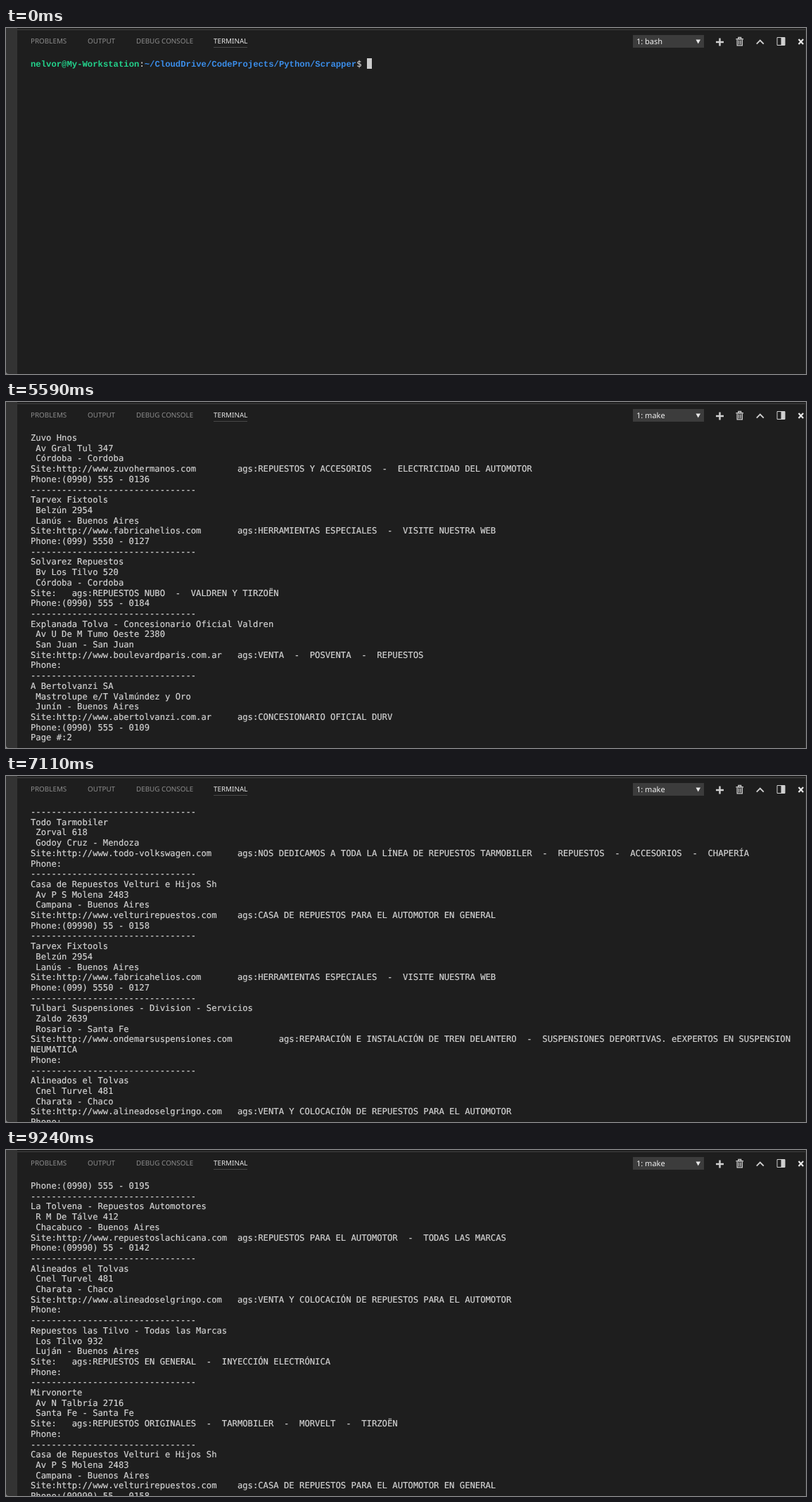
Animation, 1137 px wide and 492 px high, one loop 9.78 s. Source, as an HTML page:

```html
<!DOCTYPE html>
<html lang="es">
<head>
<meta charset="utf-8">
<title>Terminal</title>
<style>
  html, body { margin: 0; width: 100%; height: 100%; overflow: hidden; background: #1e1e1e; }
  body { position: relative; text-rendering: geometricPrecision; }
  .side { position: absolute; left: 0; top: 0; width: 16px; height: 100%; background: #888; }
  .side::after { content: ""; position: absolute; inset: 0; background: #333; border-bottom-left-radius: 4px; }
  .edge { position: absolute; left: 16px; right: 0; top: 2px; height: 1px; background: #414141; }
  .rim { position: absolute; right: 0; top: 0; width: 1px; height: 100%; background: #2c2c2c; }
  .tab { position: absolute; top: 11px; font: 9.9px/15px "Noto Sans", sans-serif; color: #8c8c8c; white-space: pre; }
  .active { color: #e7e7e7; padding-bottom: 1px; border-bottom: 1px solid #484848; }
  .select { position: absolute; left: 891px; top: 10px; width: 96px; height: 18px; padding-left: 5px;
    background: #3c3c3c; color: #f0f0f0; font: 11px/19px "Noto Sans", sans-serif; }
  svg { position: absolute; left: 0; top: 0; }
  #term { position: absolute; left: 35px; top: 44px; margin: 0; color: #d6d6d6; white-space: pre;
    font: 12.21px/14.7px "DejaVu Sans Mono", monospace; font-variant-ligatures: none;
    -webkit-text-stroke: .15px; }
  #term b { font: bold 12.25px/1px "Liberation Mono", monospace; -webkit-text-stroke: 0; }
  .user { color: #23d18b; }
  .path { color: #3b8eea; }
  .cursor { display: inline-block; position: relative; top: -1px; width: 1ch; height: 14.7px;
    vertical-align: top; background: #ccc; }
</style>
</head>
<body>
<div class="side"></div>
<div class="edge"></div>
<div class="rim"></div>
<div class="tab" style="left:35px">PROBLEMS</div>
<div class="tab" style="left:116px">OUTPUT</div>
<div class="tab" style="left:185px">DEBUG CONSOLE</div>
<div class="tab active" style="left:295px">TERMINAL</div>
<div class="select" id="shell">1: bash</div>
<svg width="1137" height="40" fill="none" stroke="#d0d0d0">
  <path d="M980.5 16.5h6.5l-3.25 6z" fill="#e8e8e8" stroke="none"/>
  <path d="M1009 20h11M1014.5 14.5v11" stroke-width="2.4"/>
  <path d="M1037.5 15.7h10.5M1041 15v-1.5h3.6V15" stroke-width="1.4"/>
  <path d="M1039.2 17v7.8h7.2V17M1041.5 17.5v6M1044 17.5v6" stroke-width="1.3"/>
  <path d="M1066.8 22.6l5-5 5 5" stroke-width="1.9"/>
  <path d="M1096 13.5h11v11h-11z"/>
  <path d="M1101.5 13.5h5.5v11h-5.5z" fill="#d0d0d0" stroke="none"/>
  <path d="M1126.5 16l6.6 7M1133.1 16l-6.6 7" stroke="#e8e8e8" stroke-width="2.2"/>
</svg>
<pre id="term"></pre>
<script>
const LOOP = 9780, ROWS = 32, COLS = 148, PAGE_SIZE = 20;
const RULE = '-'.repeat(32);
const CURSOR = '<span class="cursor"></span>';
const PROMPT = '<b class="user">nelvor@My-Workstation</b>:<b class="path">~/CloudDrive/CodeProjects/Python/Scrapper</b>$ ';

// name | street | city | site | tags | phone
const shops = `La Tolvena - Repuestos Automotores|R M De Tálve 412|Chacabuco - Buenos Aires|repuestoslachicana.com|REPUESTOS PARA EL AUTOMOTOR  -  TODAS LAS MARCAS|(09990) 55 - 0142
Zeltric Motors SA|Tirso Velmo 2740|Villa Lynch - Buenos Aires|germany-motors.com.ar|SERVICIO ESPECIALIZADO VALTORIS KENZ|
Casa Tulo|Pte L B Zumel 2918|San Martín - Buenos Aires||REPUESTOS PARA EL AUTOMOTOR|(099) 5550 - 0173
Voltamovil SRL|Av T Molvar S 362|San Juan - San Juan|electricarsrl.com|CON MAS DE 25 AÑOS DE EXPERIENCIA A LA VENTA DE REPUESTOS AUTOMOTOR (MAQUINA VIALES Y MINERO)REPARACION DE ALTERNADORES Y ARRANCADORES|
Tavu Repuestos|Molvadena 41|Trelew - Chubut||REP EN GRAL - CARBURADORES - REPARACIÓN Y ADAPTADORES - DISTRIB ELECTRÓNICOS - JUNTAS - LÍNEA LIVIANA Y PESADA -  FILTROS - TREN DELANT - CABLES DE COMPETIC|(0990) 555 - 0118
Zuvo Hnos|Av Gral Tul 347|Córdoba - Cordoba|zuvohermanos.com|REPUESTOS Y ACCESORIOS  -  ELECTRICIDAD DEL AUTOMOTOR|(0990) 555 - 0136
Tarvex Fixtools|Belzún 2954|Lanús - Buenos Aires|fabricahelios.com|HERRAMIENTAS ESPECIALES  -  VISITE NUESTRA WEB|(099) 5550 - 0127
Solvarez Repuestos|Bv Los Tilvo 520|Córdoba - Cordoba||REPUESTOS NUBO  -  VALDREN Y TIRZOËN|(0990) 555 - 0184
Explanada Tolva - Concesionario Oficial Valdren|Av U De M Tumo Oeste 2380|San Juan - San Juan|boulevardparis.com.ar|VENTA  -  POSVENTA  -  REPUESTOS|
A Bertolvanzi SA|Mastrolupe e/T Valmúndez y Oro|Junín - Buenos Aires|abertolvanzi.com.ar|CONCESIONARIO OFICIAL DURV|(0990) 555 - 0109
Almatrina SRL|Av Bv Telbán 468|Córdoba - Cordoba||DISTRIBUIDOR MAYORISTA  -  AUTOMOTORES  -  ELECTRICIDAD  -  REPUESTOS|(0990) 555 - 0151
Mavo Parts - Autopartes &amp; Accesorios|Tolbena 2873|Mataderos - Ciudad de Buenos Aires|todo-parts.com|NACIONALES E IMPORTADOS|(099) 5550 - 0162
Tolkan Rafaela|Av Tirso De La Mora 518|Rafaela - Santa Fe|nipponrafaela.com.ar|VORUNDA  -  TELVOR  -  MIRVO  -  KASTOMIRDI  -  ZUO|
Tulbari Suspensiones - Division - Servicios|Zaldo 2639|Rosario - Santa Fe|ondemarsuspensiones.com|REPARACIÓN E INSTALACIÓN DE TREN DELANTERO  -  SUSPENSIONES DEPORTIVAS. eEXPERTOS EN SUSPENSION NEUMATICA|
La Casa del Morvelt|Av Molbina 3814|Corrientes - Corrientes|lacasadelrenaultcte.com|REPUESTOS ORIGINALES Y ACCESORIOS  -  ENVÍOS AL INTERIOR CONTRA REEMBOLSO|(0990) 555 - 0195
Telvani Raul Matías|Tolbani 543|San Pedro - Buenos Aires||LÍNEA GENERAL  -  NACIONALES E IMPORTADOS|(09990) 55 - 0167
Todo Tarmobiler|Zorval 618|Godoy Cruz - Mendoza|todo-volkswagen.com|NOS DEDICAMOS A TODA LA LÍNEA DE REPUESTOS TARMOBILER  -  REPUESTOS  -  ACCESORIOS  -  CHAPERÍA|
Valtoris la Plata SRL|Ruta 94 215|La Plata - Buenos Aires|mercedeslaplata.com|DISTRIBUIDOR EXCLUSIVO PARA LATINOAMÉRICA|(0990) 555 - 0123
Lubricentro Tuvo - Lubricantes y Venta de Repuestos|Av Tolvarena 635|Goya - Corrientes|lubricentrogoya.com.ar|LUBRICANTES DISTR UVO  -  NARVI Y DRUM - VAX  Y VENTA DE REPUESTOS|
Rectificaciones a del Tolvo de e Mirez Valmundo|Av O Del Tolvo 6420|Santa Fe - Santa Fe||RECTIFICACIÓN DE MOTORES  -  VENTA DE REPUESTOS ORIGINALES|
Alineados el Tolvas|Cnel Turvel 481|Charata - Chaco|alineadoselgringo.com|VENTA Y COLOCACIÓN DE REPUESTOS PARA EL AUTOMOTOR|
Repuestos las Tilvo - Todas las Marcas|Los Tilvo 932|Luján - Buenos Aires||REPUESTOS EN GENERAL  -  INYECCIÓN ELECTRÓNICA|
Mirvonorte|Av N Talbría 2716|Santa Fe - Santa Fe||REPUESTOS ORIGINALES  -  TARMOBILER  -  MORVELT  -  TIRZOËN|
Casa de Repuestos Velturi e Hijos Sh|Av P S Molena 2483|Campana - Buenos Aires|velturirepuestos.com|CASA DE REPUESTOS PARA EL AUTOMOTOR EN GENERAL|(09990) 55 - 0158`
  .split('\n').map(line => line.split('|'));

const wrap = line => line.match(new RegExp(`.{1,${COLS}}`, 'g'));

function listing([name, street, city, site, tags, phone]) {
  const label = `Site:${site && 'http://www.' + site} `;
  const tabStop = ((label.length >> 3) + 1) * 8;
  return [name, ' ' + street, ' ' + city, ...wrap(label.padEnd(tabStop) + 'ags:' + tags), 'Phone:' + phone];
}

const span = (from, count) => Array.from({ length: count }, (_, i) => from + i);
const mix = (from, count) => span(0, count).map(i => (from + i * 7) % shops.length);

const states = [];
const log = [];
const record = (at, shell, html) => states.push({ at, shell, html });
const recordLog = at => record(at, '1: make', [...log.slice(-ROWS), CURSOR].join('\n'));

// Typing the command
const command = 'make run';
[0, 1310, 1500, 1560, 1610, 1670, 2350, 2460, 2670].forEach((at, n) =>
  record(at, '1: bash', PROMPT + command.slice(0, n) + CURSOR));

// Program start
log.push(PROMPT + command);
recordLog(3370);
log.push('pipenv run python scrapper/main.py', 'Page #:1');
recordLog(3580);
log.push('', RULE);
recordLog(4230);

// Each page arrives as a burst of prints
const pages = [
  { times: [4890, 4930, 4980, 5020], items: [...mix(11, 5), ...span(0, 5), ...mix(13, 5), ...span(5, 5)] },
  { times: [5590, 5630, 5680, 5720], items: mix(3, 20) },
  { times: [6310, 6350, 6390], items: [...mix(6, 15), ...span(10, 5)] },
  { times: [7020, 7060, 7110, 7150], items: mix(8, 20) },
  { times: [7710, 7750, 7800], items: [...mix(1, 14), 9, ...span(15, 5)] },
  { times: [8470, 8510, 8560, 8600], items: mix(17, 20) },
  { times: [9120, 9160, 9200, 9240], items: [...mix(4, 14), 14, 0, ...span(20, 4)] }
];

pages.forEach(({ times, items }, page) => {
  let prints = times;
  if (page > 0) {
    log.push('', RULE);
    recordLog(times[0]);
    prints = times.slice(1);
  }
  let shown = 0;
  prints.forEach((at, i) => {
    const end = Math.round(PAGE_SIZE * (i + 1) / prints.length);
    for (; shown < end; shown++) {
      log.push(...listing(shops[items[shown]]), shown < PAGE_SIZE - 1 ? RULE : `Page #:${page + 2}`);
    }
    recordLog(at);
  });
});

const term = document.getElementById('term');
const shell = document.getElementById('shell');
let current;

function draw() {
  const t = performance.now() % LOOP;
  const state = states.findLast(s => s.at <= t);
  if (state !== current) {
    current = state;
    term.innerHTML = state.html;
    shell.textContent = state.shell;
  }
  requestAnimationFrame(draw);
}
draw();
</script>
</body>
</html>
```
